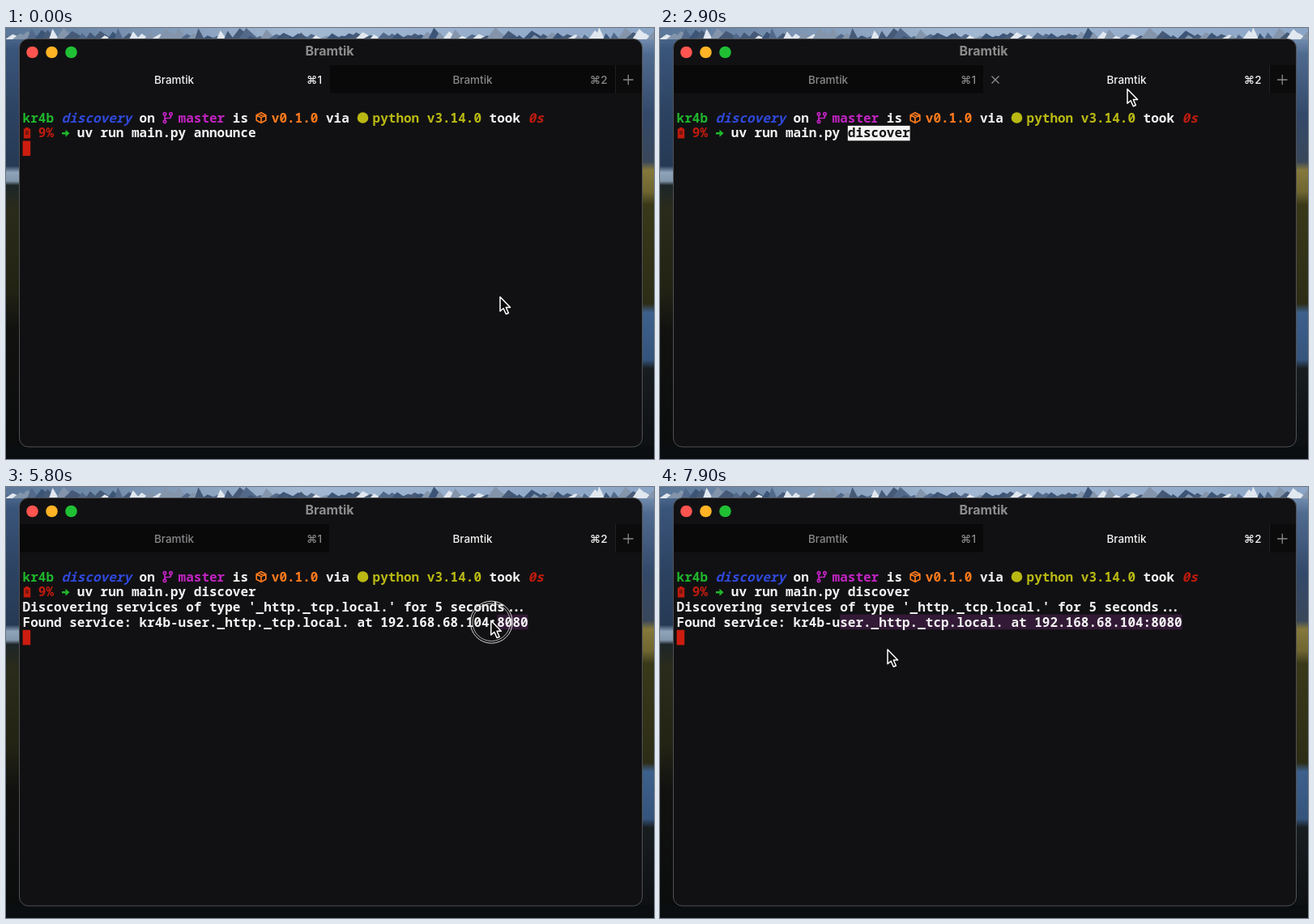
Write an HTML page that moves like this. It is 800 px wide and 533 px high and loops after 8 s.

```html
<!DOCTYPE html>
<html lang="en">
<head>
<meta charset="utf-8">
<title>Terminal session</title>
<style>
html, body { margin: 0; width: 100%; height: 100%; overflow: hidden; background: #0d0f10; }
svg { display: block; width: 100vw; height: 100vh; }
.mono text { font: 600 16px "Noto Sans Mono", "Liberation Mono", monospace; fill: #f2f2f2; white-space: pre; }
.mono .b { font-weight: 800; }
.mono .i { font-style: italic; }
.ui text { font: 500 13.5px Inter, "DejaVu Sans", sans-serif; }
.ui .title { font-weight: 700; font-size: 16px; fill: #8c8c8d; }
</style>
</head>
<body>
<svg viewBox="0 0 800 533">
  <defs>
    <linearGradient id="left" x2="0" y2="1">
      <stop offset="0" stop-color="#5a7698"/><stop offset=".05" stop-color="#3a557a"/>
      <stop offset=".2" stop-color="#2c4261"/><stop offset=".32" stop-color="#263a54"/>
      <stop offset=".335" stop-color="#8ea2b8"/><stop offset=".355" stop-color="#8296ab"/>
      <stop offset=".365" stop-color="#1d2628"/><stop offset=".42" stop-color="#2a2b1a"/>
      <stop offset=".6" stop-color="#232314"/><stop offset=".7" stop-color="#111210"/>
      <stop offset="1" stop-color="#0a0c0c"/>
    </linearGradient>
    <linearGradient id="right" x2="0" y2="1">
      <stop offset="0" stop-color="#8ba5c6"/><stop offset=".06" stop-color="#506b90"/>
      <stop offset=".2" stop-color="#33496a"/><stop offset=".31" stop-color="#39475a"/>
      <stop offset=".33" stop-color="#85783b"/><stop offset=".38" stop-color="#6f6631"/>
      <stop offset=".41" stop-color="#393819"/><stop offset=".64" stop-color="#2d2d17"/>
      <stop offset=".66" stop-color="#3d608c"/><stop offset=".77" stop-color="#35547c"/>
      <stop offset=".79" stop-color="#181d20"/><stop offset="1" stop-color="#0c0e10"/>
    </linearGradient>
    <linearGradient id="sky">
      <stop offset="0" stop-color="#5a7698"/><stop offset=".45" stop-color="#a2b8d2"/>
      <stop offset="1" stop-color="#8ba5c6"/>
    </linearGradient>
  </defs>
  <rect width="400" height="533" fill="url(#left)"/>
  <rect x="400" width="400" height="533" fill="url(#right)"/>
  <rect width="800" height="14" fill="url(#sky)"/>
  <g id="peaks"></g>
  <rect y="517" width="800" height="16" fill="#0b0e10"/>

  <rect x="16.5" y="13.5" width="769" height="504.500" rx="11" fill="#111113" stroke="#505154"/>
  <g class="ui">
    <circle cx="32.500" cy="30" r="7.300" fill="#ff544f"/>
    <circle cx="56.500" cy="30" r="7.300" fill="#ffb325"/>
    <circle cx="80.500" cy="30" r="7.300" fill="#20c035"/>
    <text class="title" x="399.500" y="33.500" text-anchor="middle">Bramtik</text>
    <rect id="dim" y="46" height="34.500" fill="#09090a"/>
    <rect x="753" y="46" width="32" height="34.500" fill="#0b0b0c"/>
    <path d="M752.500 46v34.500" stroke="#202022"/>
    <g id="tab1"><text x="207.500" y="68.500" text-anchor="middle">Bramtik</text><text x="390" y="68.500" text-anchor="end">⌘1</text></g>
    <g id="tab2"><text x="576" y="68.500" text-anchor="middle">Bramtik</text><text x="742.500" y="68.500" text-anchor="end">⌘2</text></g>
    <path d="M762 64h12.500M768.250 57.800v12.500" stroke="#8a8a8b" stroke-width="1.300"/>
    <path id="close" d="M409.500 59.500l9 9m0-9l-9 9" stroke="#929293" stroke-width="1.200"/>
  </g>

  <g class="mono">
    <rect id="selection" y="157.600" height="18.700" fill="#321a36"/>
    <g id="prompt"></g>
    <g id="announce"></g>
    <g id="registering"></g>
    <g id="discover"></g>
    <g id="inverse"></g>
    <g id="discovering"></g>
    <g id="found"></g>
    <rect id="caret" width="9.600" height="18.600" fill="#cc1d10"/>
  </g>

  <g id="ring" fill="none" stroke="#d8d8d8">
    <circle r="26"/><circle r="23.300" stroke-width=".8"/>
  </g>
  <path id="mouse" d="M0 0V17.800L4.100 14.200L7.300 21.300L10.400 20L7.300 13H12.600Z"
    fill="#0c0c0d" stroke="#fff" stroke-width="1.500" stroke-linejoin="round"/>
</svg>
<script>
const LOOP = 8000, CELL = 9.6, ROW = 18.65;
const SWITCH = 2500, ENTER = 4000, DRAG = 5600, RELEASE = 7300;
const el = id => document.getElementById(id);
const colX = c => 20.6 + c * CELL;
const rowY = r => 102.2 + r * ROW;
const text = (c, r, str, fill = "#f2f2f2", cls = "") =>
  `<text x="${colX(c)}" y="${rowY(r) + 14.6}" class="${cls}" style="fill:${fill}">${str}</text>`;
const dots = (c, r) =>
  `<text x="${colX(c) + 3}" y="${rowY(r) + 14.6}" letter-spacing="-3.2">...</text>`;
const show = (id, on) => el(id).setAttribute("visibility", on ? "visible" : "hidden");
const set = (id, attrs) => { for (const k in attrs) el(id).setAttribute(k, attrs[k]); };

const GREEN = "#20b62c", BLUE = "#3049dc", PINK = "#c224c2", ORANGE = "#ff7a1c",
  YELLOW = "#bab913", RED = "#bf1b0e";

el("prompt").innerHTML =
  text(0, 0, "kr4b", GREEN, "b") + text(5, 0, "discovery", BLUE, "b i") + text(15, 0, "on") +
  text(20, 0, "master", PINK, "b") + text(27, 0, "is") + text(32, 0, "v0.1.0", ORANGE, "b") +
  text(39, 0, "via") + text(45, 0, "python v3.14.0", YELLOW, "b") + text(60, 0, "took") +
  text(65, 0, "0s", RED, "b i") + text(2, 1, "9%", RED, "b") + text(7, 1, "uv run main.py") +
  // branch
  `<g fill="none" stroke="${PINK}" stroke-width="1.7"><path d="M196 108v6M203.500 108v1.500q0 2-2 2H198q-2 0-2 2.500"/>
   <circle cx="196" cy="106.300" r="1.700"/><circle cx="203.500" cy="106.300" r="1.700"/><circle cx="196" cy="115.800" r="1.700"/></g>` +
  // package
  `<path d="M315 104.800l5.800 3v6.500l-5.800 3-5.800-3v-6.500zm-5.800 3l5.800 3 5.800-3M315 110.800v6.500M312 106.300l5.800 3"
   fill="none" stroke="${ORANGE}" stroke-width="1.700" stroke-linejoin="round"/>` +
  `<circle cx="440.500" cy="111" r="6.800" fill="${YELLOW}"/>` +
  // battery
  `<path d="M24 123h4v1.500h2.200v12H21.800v-12H24z" fill="${RED}"/><path d="M24 127h4v5h-4z" fill="#7d150c"/>` +
  // arrow
  `<path d="M69 129h4.500v-3.200l5 4.500-5 4.500v-3.200H69z" fill="${GREEN}"/>`;

el("announce").innerHTML = text(22, 1, "announce");
el("discover").innerHTML = text(22, 1, "discover");
el("inverse").innerHTML =
  `<rect x="${colX(22)}" y="${rowY(1)}" width="${8 * CELL}" height="18.500" fill="#f4f4f4"/>` +
  text(22, 1, "discover", "#111113");
el("registering").innerHTML = text(3, 2, "Registering service") + dots(22, 2) +
  // satellite dish
  `<path d="M30 151l5 6h3.500l-3-9z" fill="#85898d"/>
   <ellipse cx="28.500" cy="149" rx="8.500" ry="5" transform="rotate(45 28.500 149)" fill="#a9adb1"/>
   <ellipse cx="29.500" cy="148" rx="8" ry="3.600" transform="rotate(45 29.500 148)" fill="#e3e5e7"/>
   <path d="M29 148.500l5-5" stroke="#7c8084" stroke-width="1.300"/><circle cx="34.300" cy="143" r="1.500" fill="#c9ccd0"/>`;
el("discovering").innerHTML =
  text(0, 2, "Discovering services of type '_http._tcp.local.' for 5 seconds") + dots(62, 2);
el("found").innerHTML =
  text(0, 3, "Found service: kr4b-user._http._tcp.local. at 192.168.68.104:8080");

// Snowy ridge along the top edge
let seed = 7;
const rand = () => (seed = seed * 16807 % 2147483647) / 2147483647;
const tones = ["#3c5577", "#53698a", "#e2e8ef", "#8495ab", "#465a77"];
let ridge = "";
for (let x = -10; x < 800; x += 9) {
  const h = 4 + rand() * (x < 335 || x > 500 ? 11 : 5), w = 6 + rand() * 13;
  ridge += `<path d="M${x} 14l${w * .6} ${-h}l${w} ${h}z" fill="${tones[rand() * 5 | 0]}"/>`;
}
el("peaks").innerHTML = ridge;

// Pointer waypoints: time, x, y
const path = [
  [0, 610, 332.5], [1700, 610, 332.5], [2400, 577, 75.5], [3000, 577, 75.5],
  [3600, 444, 249.5], [4200, 444, 249.5], [4900, 708, 294.5], [5450, 644, 166],
  [DRAG, 644, 166], [6600, 419, 162], [7200, 224, 165], [RELEASE, 224, 165],
  [7800, 281, 201], [LOOP, 281, 201]
];
function pointer(t) {
  const i = path.findIndex(p => p[0] > t), [t0, x0, y0] = path[i - 1], [t1, x1, y1] = path[i];
  const k = (t - t0) / (t1 - t0), drag = t0 >= DRAG && t1 <= RELEASE;
  const e = drag ? k : k * k * (3 - 2 * k);
  return [x0 + (x1 - x0) * e, y0 + (y1 - y0) * e];
}

function draw(t) {
  const second = t >= SWITCH, ran = t >= ENTER;
  const registered = t >= 700, discovering = t >= 4500, found = t >= 4700;
  const [x, y] = pointer(t);

  set("dim", second ? { x: 17, width: 382 } : { x: 400, width: 352 });
  set("tab1", { fill: second ? "#88888a" : "#f1f1f1" });
  set("tab2", { fill: second ? "#f1f1f1" : "#88888a" });
  show("close", x > 399 && x < 752 && y > 46 && y < 81);
  show("announce", !second);
  show("registering", !second && registered);
  show("inverse", second && !ran);
  show("discover", second && ran);
  show("discovering", discovering);
  show("found", found);

  const row = !second ? (registered ? 3 : 2) : !ran ? 1 : 2 + discovering + found;
  const phase = !second ? 0 : ran ? 700 : 200;
  set("caret", { x: colX(second && !ran ? 30 : 0), y: rowY(row) });
  show("caret", (t + phase) % 1200 < 600);

  const from = t < DRAG ? 65 : t < RELEASE ? Math.round((x - 20.6) / CELL + .5) : 21;
  const start = Math.max(21, Math.min(65, from));
  set("selection", { x: colX(start), width: (65 - start) * CELL });

  set("mouse", { transform: `translate(${x} ${y})` });
  set("ring", { transform: `translate(${x + .5} ${y + 2})` });
  show("ring", t >= SWITCH - 80 && t < SWITCH + 80 || t >= DRAG - 100 && t < RELEASE);
}

function tick() {
  draw(performance.now() % LOOP);
  requestAnimationFrame(tick);
}
tick();
</script>
</body>
</html>
```
